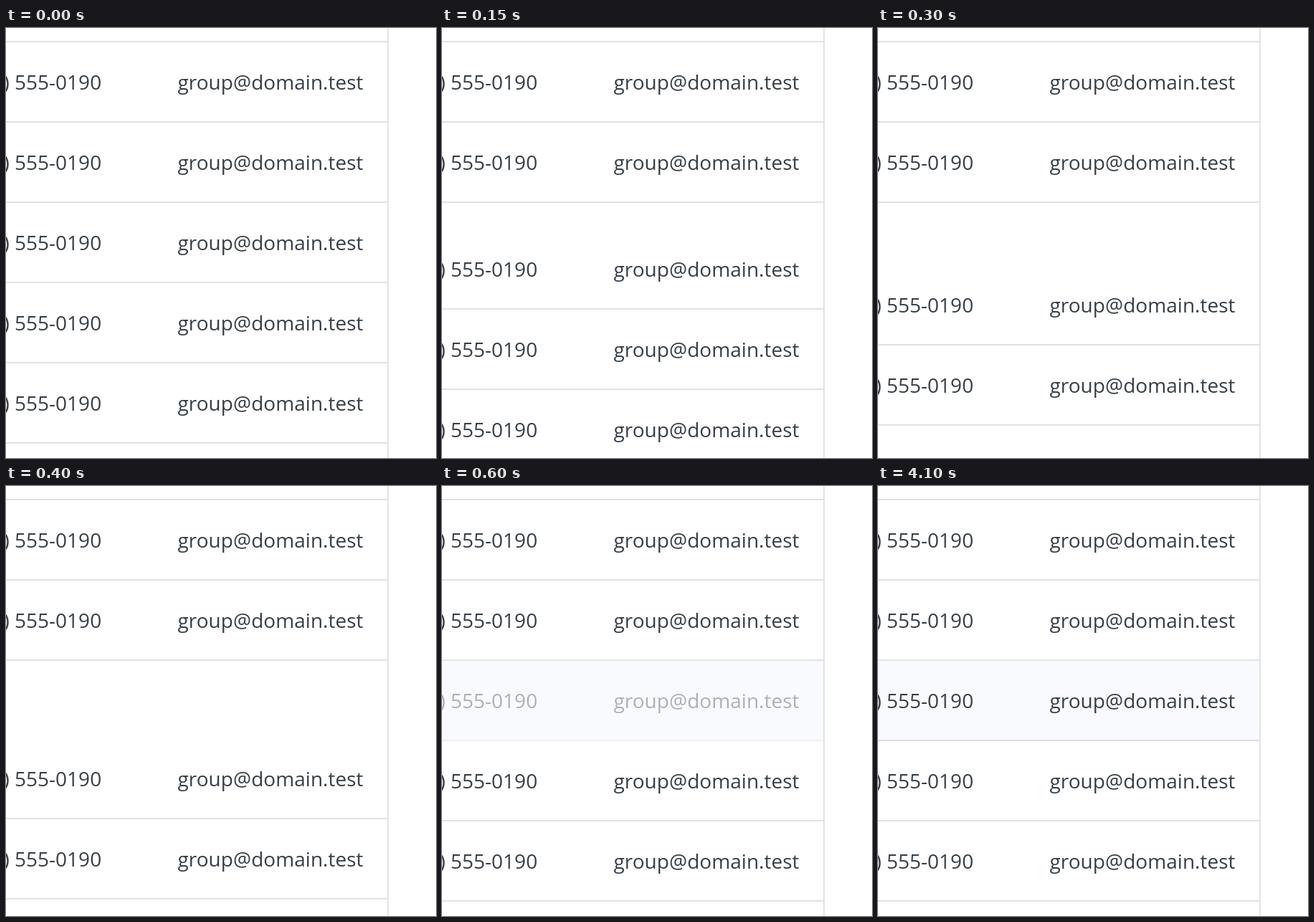
An HTML page that plays this animation: 600 px wide and 600 px high, repeating every 5.75 s.

```html
<!DOCTYPE html>
<html lang="en">
<head>
<meta charset="utf-8">
<title>Inserting a table row</title>
<style>
  html, body { margin: 0; width: 100%; height: 100%; overflow: hidden; background: #fff; }
  .stage { position: relative; width: 600px; height: 600px; overflow: hidden; }
  .table {
    position: absolute; left: 0; top: 0; width: 532px; height: 600px;
    border-right: 2px solid #e1e3e4;
  }
  .row {
    position: absolute; left: 0; width: 532px; height: 110px;
    border-bottom: 2px solid rgba(0, 8, 16, .115);
    font: 28px/110px "Open Sans", "Noto Sans", sans-serif;
    color: #373f47; white-space: pre;
  }
  .row span { position: absolute; top: 0; }
  .phone { left: -3.5px; }
  .mail { left: 239.5px; }
</style>
</head>
<body>
<div class="stage"><div class="table" id="table"></div></div>
<script>
  const LOOP = 5750, TICK = 50, ROW = 112, TOP = 20;
  const SLIDE = { start: 60.5, length: 385 };
  const FADE = { start: 500, length: 250 };
  const DIM_AT = 4100;
  const STRONG = '#eff4fc', PALE = '#f8fafe';
  const table = document.getElementById('table');

  function addRow(slot) {
    const row = document.createElement('div');
    row.className = 'row';
    row.style.top = TOP + slot * ROW + 'px';
    row.innerHTML = '<span class="phone">) 555-0190</span>' +
                    '<span class="mail">group@domain.test</span>';
    table.append(row);
    return row;
  }

  addRow(-1);
  addRow(0);
  addRow(1);
  const fresh = addRow(2);
  const lower = [2, 3, 4, 5].map(addRow);

  const progress = (t, { start, length }) =>
    Math.min(1, Math.max(0, (t - start) / length));

  // cubic-bezier(0, 0, .65, 1), solved by bisection
  function easeOut(x) {
    let lo = 0, hi = 1;
    for (let i = 0; i < 24; i++) {
      const u = (lo + hi) / 2;
      if (1.95 * u * u - 0.95 * u ** 3 < x) lo = u; else hi = u;
    }
    return 3 * lo * lo - 2 * lo ** 3;
  }

  function draw(time) {
    const t = Math.floor((time % LOOP) / TICK) * TICK;
    const shift = Math.round(ROW * easeOut(progress(t, SLIDE)));
    for (const row of lower) row.style.transform = `translateY(${shift}px)`;
    fresh.style.opacity = progress(t, FADE);
    fresh.style.background = t < DIM_AT ? STRONG : PALE;
  }

  const begin = performance.now();
  function frame() {
    draw(performance.now() - begin);
    requestAnimationFrame(frame);
  }
  frame();
</script>
</body>
</html>
```
